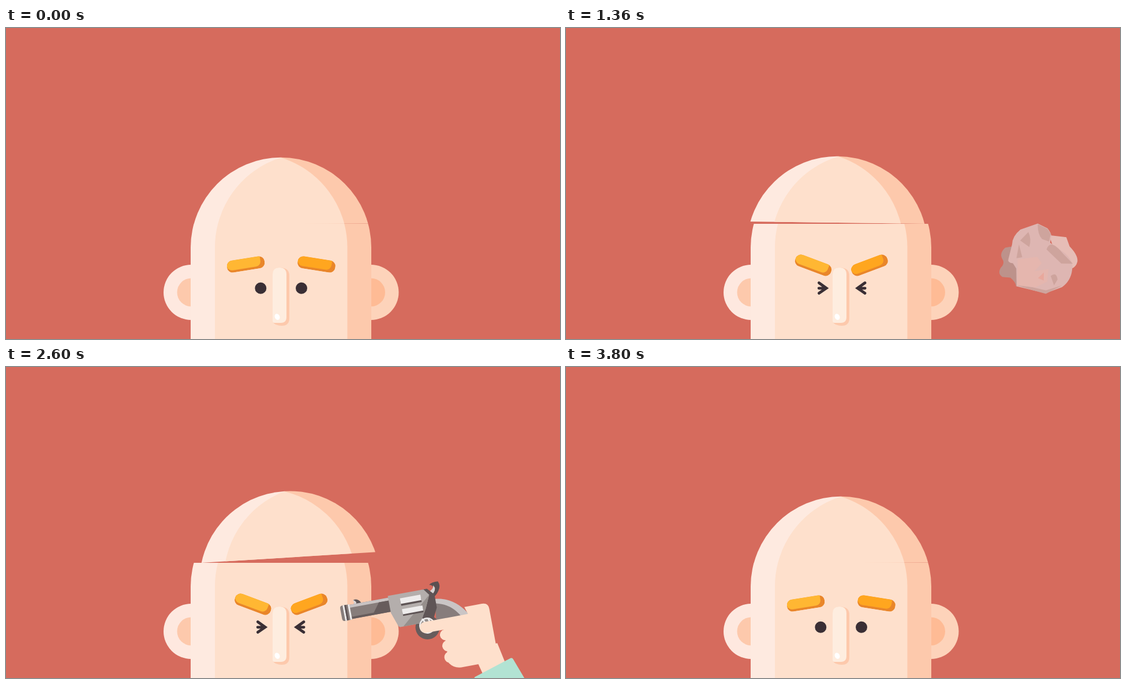
Write an HTML page that moves like this. It is 960 by 540 pixels and loops after 3840 ms.

```html
<!DOCTYPE html>
<html lang="en">
<head>
<meta charset="utf-8">
<title>Idea</title>
<style>
html, body { margin: 0; width: 100%; height: 100%; overflow: hidden; background: #d66b5d; }
svg { display: block; width: 100%; height: 100%; }
</style>
</head>
<body>
<svg viewBox="0 0 960 540">
  <defs>
    <clipPath id="above"><rect x="200" y="100" width="600" height="240"/></clipPath>
    <clipPath id="below"><rect x="200" y="340" width="600" height="300"/></clipPath>
    <clipPath id="browClip"><rect x="-33" y="-10.5" width="66" height="21" rx="10"/></clipPath>
    <path id="glass" d="M458.500 420V340C456 322 450 316 440 309C424 297 417 274 417 250C417 211 444 185 476.500 185S536 211 536 250C536 274 529 297 513 309C503 316 496 322 494 340V420Z"/>
    <clipPath id="glassClip"><use href="#glass"/></clipPath>
    <g id="skull">
      <path fill="#feeae0" d="M320 600V381A156.500 156.500 0 0 1 477 224.800V600Z"/>
      <path fill="#fdc9ac" d="M476.500 224.800A156.500 156.500 0 0 1 633 381V600H476.500Z"/>
      <path fill="#fee0cc" d="M362 600V381A163.500 163.500 0 0 1 476.500 225A163.500 163.500 0 0 1 591.500 381V600Z"/>
    </g>
    <g id="paper">
      <path fill="#aeaaa8" d="M-47-20L-58-18Q-68-8-63 1Q-57 9-65 17Q-71 27-62 33L-48 34Q-38 42-38 49L-20 46L-30-10Z"/>
      <path fill="#f1efec" d="M18-41L48-38L54-22Q69-7 68 4Q66 13 59 16L30-8Z"/>
      <path fill="#e3e3e5" d="M-46-24Q-46-38-32-50L-2-61L15-53Q21-46 22-40L20-28L46-10Q62 4 59 19Q57 38 42 49L14 60L-10 55L-37 49L-38 18L-44 9Q-54 8-52 2Z"/>
      <path fill="#cac7c4" d="M-2-60L15-52L21-43L18-30L6-34Q-2-42-2-60ZM-32-31L-18-46Q-12-34-16-20ZM14-16Q20-36 42-10L60 8L40 8ZM-38 0L-34-24L-28-2ZM-37 47L-10 50L14 55L42 46L14 61L-10 55ZM22 30Q32 22 34 36L28 46Z"/>
      <path fill="#eee3df" d="M-36 2L-2-3L6 8L-6 22L18 18L16 40L-4 50L-36 47Z"/>
      <path fill="#f5cdc3" d="M0 34L10 24L10 38Z"/>
    </g>
  </defs>

  <g id="balls"></g>

  <g id="bulb">
    <use href="#glass" fill="#ffda43"/>
    <g clip-path="url(#glassClip)" fill="#fff27d">
      <circle cx="501" cy="284" r="60"/><rect x="447" y="312" width="60" height="110"/>
    </g>
    <path fill="#fff" opacity=".78" d="M450 200C491 183 527 212 527 250C527 275 521 291 510 303C519 277 517 256 509 238C497 211 477 199 450 200Z"/>
    <path fill="none" stroke="#fff" stroke-width="5" d="M468 420V322L443 280C435 267 436 243 452 243C468 243 476 256 476 272C476 284 472 290 466 290S456 284 456 272C456 256 464 243 476.500 243S497 256 497 272C497 284 493 290 487 290S477 284 477 272C477 256 485 243 501 243C517 243 518 267 510 280L485 322V420"/>
  </g>
  <path id="bang" fill="#fff" d="M475 85h8v42h-8zM475 139h8v12h-8z"/>

  <g id="lid"><use href="#skull" clip-path="url(#above)"/></g>

  <circle cx="321" cy="459" r="48" fill="#fee8df"/>
  <circle cx="321" cy="459" r="24.500" fill="#fdc9ac"/>
  <circle cx="632.500" cy="459" r="48" fill="#fdd3ba"/>
  <circle cx="632.500" cy="459" r="24.500" fill="#febb95"/>
  <use href="#skull" clip-path="url(#below)"/>

  <path fill="#fdc9ac" d="M462 428Q463 416 474 416Q491 416 491 430V504Q491 517 478 517Q466 517 462 510Z"/>
  <path fill="#feeddf" d="M462 428Q462 416 474 416T486 428V502Q486 512 476 512H465Q462 512 462 509Z"/>
  <ellipse cx="470" cy="501.500" rx="4.300" ry="5.500" fill="#fff" transform="rotate(-25 470 501.500)"/>

  <g fill="#3a2f35" id="open"><circle cx="441.300" cy="451.800" r="10"/><circle cx="512" cy="451.800" r="10"/></g>
  <g id="shut" fill="none" stroke="#3a2f35" stroke-width="4.800" stroke-linecap="round" stroke-linejoin="miter">
    <path d="M436.700 442.500L449.500 451.800L436.700 460.500M436.500 451.800H447"/>
    <path d="M516.300 442.500L503.500 451.800L516.300 460.500M516.500 451.800H506"/>
  </g>
  <g id="browL" clip-path="url(#browClip)">
    <rect x="-33" y="-10.500" width="66" height="21" fill="#e9862a"/>
    <rect x="-33" y="-20" width="59" height="26.500" rx="9" fill="#ffb733"/>
  </g>
  <g id="browR" clip-path="url(#browClip)">
    <rect x="-33" y="-10.500" width="66" height="21" fill="#e9862a"/>
    <rect x="-33" y="-20" width="59" height="26.500" rx="9" fill="#ffa61f"/>
  </g>

  <g id="arm">
    <path fill="#fee0cc" d="M846 478L892 472L904 508L866 530Z"/>
    <path fill="#b2e3d3" d="M850 528L912 500Q916 498 918 502L966 596L890 630L848.500 532Q848 529 850 528Z"/>
  </g>
  <g id="gun">
    <path fill="#d8d4d3" d="M674 357Q680 355 676 350Q684 345 690 357Z"/>
    <path fill="#5f5556" d="M680 357Q684 353 677 349Q686 347 690 357Z"/>
    <path fill="#877d7b" d="M666 356H740V381H666Z"/>
    <path fill="#c9c3c3" d="M666 356H740V361H666Z"/>
    <path fill="#675c5c" d="M720 361H740V381H666V377H708Z"/>
    <path fill="#877d7b" d="M656 355H669V382H656Q652 382 652 377V360Q652 355 656 355Z"/>
    <path fill="#eeecec" d="M657 355h3v27h-3zM666 355h3v27h-3z"/>
    <path fill="#5f5556" d="M660 355h3v27h-3z"/>
    <path fill="#877d7c" d="M816 373C842 377 860 392 870 411H812Z"/>
    <path fill="#cac5c5" d="M816 373C842 375 860 392 870 411H856C846 394 834 385 817 381Z"/>
    <circle cx="795" cy="419" r="21" fill="#675c5c"/>
    <path fill="#5a5051" d="M803 362Q817 361 818 354Q817 348 811 347Q816 343 827 344Q831 352 825 360Q820 368 808 373Z"/>
    <path fill="#d8d4d3" d="M806 359Q817 357 818 349L820 354Q819 363 808 366Z"/>
    <path fill="#5f5556" d="M798 353H806L817 365V388L806 410H785Z"/>
    <path fill="#b4aeac" d="M737 353H800L808 364L798 386L784 410H750Q746 410 745 406L737 383Z"/>
    <path fill="#968f8c" d="M808 364L798 386L784 410H754Z"/>
    <path fill="#5f5556" d="M757 366h36v8h-36zM757 385h36v7h-36z"/>
    <path fill="#eeecec" d="M757 361h36v9.500h-36zM757 380h36v9h-36z"/>
    <circle cx="795" cy="416" r="14" fill="#eeecec"/>
    <circle cx="795" cy="416" r="11.500" fill="#968f8c"/>
    <path fill="none" stroke="#eeecec" stroke-width="3" d="M788 403Q794 409 792 418M799 404L801 414"/>
    <g fill="#fee0cc">
      <path d="M791 409H868L864 396H895Q906 396 906 407V488Q906 498 896 498H840Q828 498 820 487L822 428H791A9.500 9.500 0 0 1 791 409Z"/>
      <circle cx="823" cy="437.500" r="9.500"/><circle cx="823.500" cy="457" r="9.500"/><circle cx="824" cy="477" r="10"/>
    </g>
  </g>
</svg>
<script>
const LOOP = 3840;
const $ = id => document.getElementById(id);
const move = (id, value) => $(id).setAttribute('transform', value);
const show = (id, on) => $(id).setAttribute('visibility', on ? 'visible' : 'hidden');
const clamp = v => Math.max(0, Math.min(1, v));
const wave = (t, period) => Math.sin(2 * Math.PI * t / period);

const ease = {
  in: p => p * p,
  out: p => 1 - (1 - p) ** 3,
  both: p => p * p * (3 - 2 * p)
};

// keys: [time, value, easing of the step that leads here]
function track(t, keys) {
  if (t <= keys[0][0]) return keys[0][1];
  for (let i = 1; i < keys.length; i++) {
    const [t0, v0] = keys[i - 1], [t1, v1, kind] = keys[i];
    if (t < t1) return v0 + (v1 - v0) * ease[kind || 'both']((t - t0) / (t1 - t0));
  }
  return keys[keys.length - 1][1];
}

const balls = [
  { start: 60, end: 560, from: [322, 240], to: [216, 470], dir: -1 },
  { start: 600, end: 1120, from: [321, 226], to: [267, 388], dir: -1 },
  { start: 1140, end: 1640, from: [640, 245], to: [856, 433], dir: 1 }
];
for (const ball of balls) {
  ball.el = document.createElementNS('http://www.w3.org/2000/svg', 'use');
  ball.el.setAttribute('href', '#paper');
  $('balls').append(ball.el);
}

function drawBalls(t) {
  for (const { start, end, from, to, dir, el } of balls) {
    const p = clamp((t - start) / (end - start)), e = ease.out(p);
    const x = from[0] + (to[0] - from[0]) * e;
    const y = from[1] + (to[1] - from[1]) * e;
    const size = (20 + 140 * e) / 136;
    el.setAttribute('opacity', p > 0 && p < 1 ? Math.min(p * 3.5, 1.12 * (1 - p)) : 0);
    el.setAttribute('transform', `translate(${x} ${y}) scale(${size}) rotate(${dir * (e - 0.82) * 150})`);
  }
}

function drawLid(t) {
  const angle = track(t, [[1990, 0], [2110, 99, 'out'], [2190, 99], [2460, 0, 'in'],
    [2680, 0], [2800, 101, 'out'], [2920, 99.4], [3470, 99.4], [3720, 0, 'in']]);
  if (angle > 0) {
    const slide = clamp(angle / 20);
    return move('lid', `translate(${-8 * slide} ${1.5 * slide}) rotate(${angle} 627.5 340)`);
  }
  if (t < 80 || t > 3720) return move('lid', 'rotate(-.16 477 340)');
  const power = t < 1990 ? 13.2 * t / 1920 : t < 2680 ? 13.2 * clamp((t - 2460) / 60) : 0;
  const x = power * wave(t - 640, -341.3);
  const tilt = -0.0204 * x * Math.abs(x);
  move('lid', `translate(${x} 0) rotate(${tilt} ${tilt > 0 ? 627.5 : 326} 340)`);
}

function drawFace(t) {
  const strained = t >= 120 && t < 2840;
  const shake = strained ? 1.7 * wave(t - 640, 170) : 0;
  show('open', !strained);
  show('shut', strained);
  move('shut', `translate(${shake} 0)`);
  const pose = (sad, mad, calm) => track(t, [[40, sad], [200, mad], [2800, mad], [2890, calm, 'out'],
    [3420, calm], [3580, sad]]);
  const angle = pose(-9, 20.5, 0), x = pose(415.5, 428, 420.2), y = pose(410.5, 412, 402.5);
  const sway = shake * 0.3;
  move('browL', `translate(${x + sway} ${y}) rotate(${angle})`);
  move('browR', `translate(${953.5 - x + sway} ${y}) rotate(${-angle})`);
}

function drawGun(t) {
  const aim = 1 - track(t, [[1980, 0], [2050, 1, 'out'], [2290, 1], [2520, 0], [2670, 0], [2740, 1, 'out']]);
  const away = track(t, [[1560, 1], [1760, 0, 'out'], [2800, 0], [2930, 1, 'in']]);
  const dx = 20 * away, dy = 235 * away;
  move('gun', `translate(${dx - 65 * aim} ${dy + 33 * aim}) rotate(${-10.5 * aim} 795 416)`);
  move('arm', `translate(${dx - 39 * aim} ${dy + 6 * aim}) rotate(${-3.5 * aim} 915 499)`);
}

function draw(t) {
  drawBalls(t);
  drawLid(t);
  drawFace(t);
  drawGun(t);
  const sink = track(t, [[2740, 165], [2860, -5, 'out'], [2950, 0], [3410, 0], [3580, 165, 'in']]);
  move('bulb', `translate(0 ${sink})`);
  show('bulb', t > 2740 && t < 3580);
  show('bang', t >= 2880 && t < 3360);
}

const begin = performance.now();
function tick() {
  draw((performance.now() - begin) % LOOP);
  requestAnimationFrame(tick);
}
tick();
</script>
</body>
</html>
```
